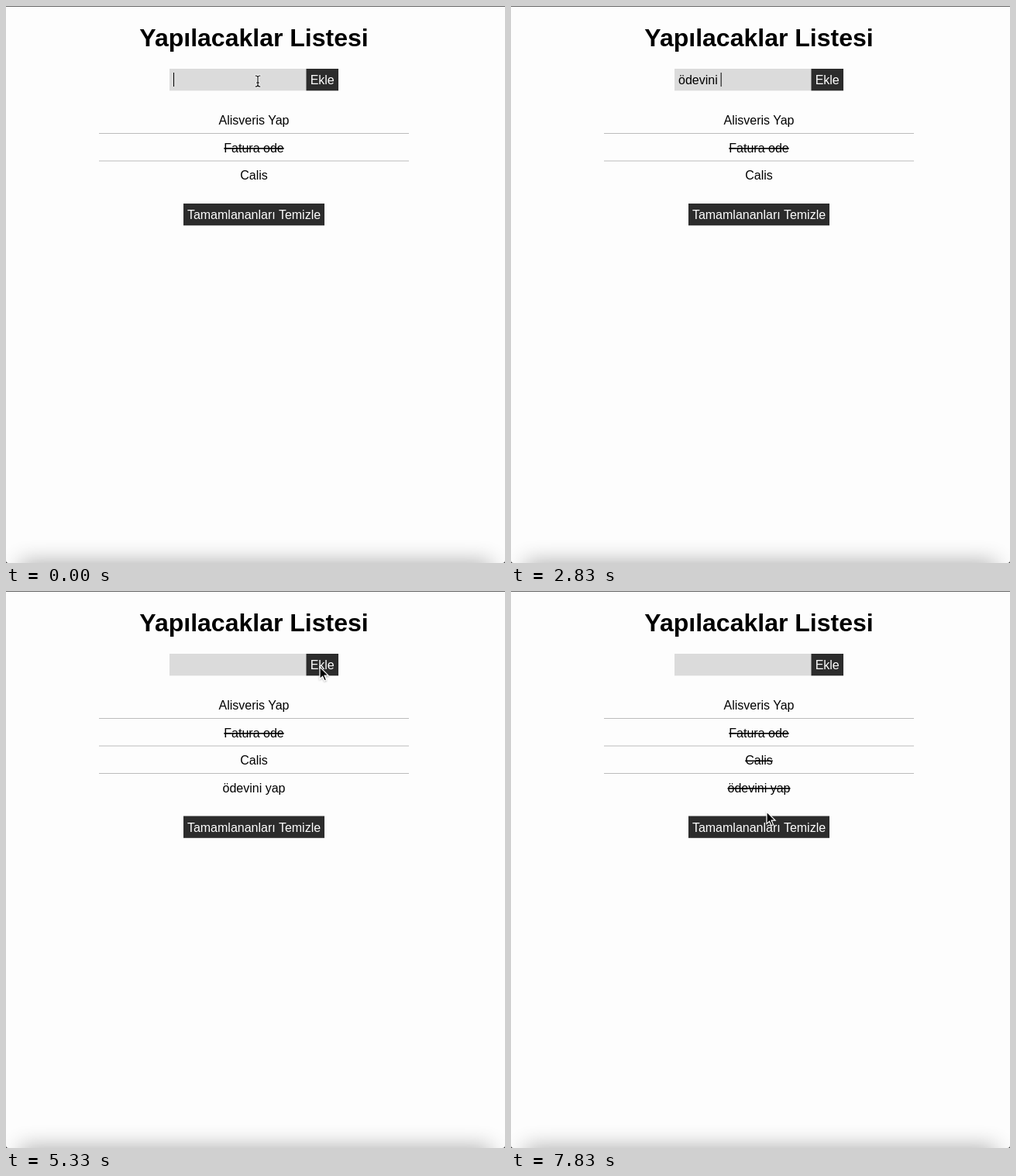
Recreate the animation shown at these times as an HTML page. Size 644 by 719 pixels, loop 8 s.

```html
<!DOCTYPE html>
<html lang="tr">
<head>
<meta charset="utf-8">
<title>Yapılacaklar Listesi</title>
<style>
  html, body { margin: 0; width: 100%; height: 100%; overflow: hidden; background: #fdfdfd; }
  svg { display: block; width: 644px; height: 719px; }
  text { font: 16px "Liberation Sans", Arial, sans-serif; white-space: pre; }
  .mid { text-anchor: middle; }
  .title { font-size: 32px; font-weight: bold; }
  .light { fill: #fff; }
  .dark { fill: #2c2c2c; }
  .done { text-decoration: line-through; }
  .rule { fill: #bcbcbc; }
</style>
</head>
<body>
<svg viewBox="0 0 644 719">
  <defs>
    <filter id="soft" x="-20%" y="-150%" width="140%" height="400%"><feGaussianBlur stdDeviation="14"/></filter>
    <filter id="drop" x="-50%" y="-50%" width="200%" height="200%">
      <feDropShadow dx="0" dy="1" stdDeviation="1" flood-opacity=".3"/>
    </filter>
  </defs>
  <rect width="644" height="719" fill="#fdfdfd"/>
  <rect x="18" y="717" width="608" height="60" opacity=".3" filter="url(#soft)"/>
  <rect width="644" height="1" fill="#666"/>
  <path d="M0 716Q0 719 3 719H0ZM644 716Q644 719 641 719H644Z" fill="#222"/>

  <text class="mid title" x="320" y="52">Yapılacaklar Listesi</text>
  <rect x="211" y="81" width="177" height="28.3" fill="#dbdbdb"/>
  <rect class="dark" x="387.5" y="81" width="41.5" height="28.3"/>
  <text class="mid light" x="408.2" y="101">Ekle</text>
  <text id="entry" x="216" y="101"></text>
  <rect id="caret" y="86" width="1" height="18"/>

  <g id="list"></g>
  <g id="clear">
    <rect class="dark" x="229" y="255" width="182" height="28.3"/>
    <text class="mid light" x="320" y="275">Tamamlananları Temizle</text>
  </g>

  <g id="cursor">
    <path id="arrow" d="M0 0V15.5L3.6 12.2 6 17.8 8.5 16.7 6.1 11.2H11Z" stroke="#fff" stroke-width="1.2" filter="url(#drop)"/>
    <g id="beam" fill="none" stroke-linecap="round">
      <path d="M-3-7Q0-7 0-5Q0-7 3-7M0-5V5M-3 7Q0 7 0 5Q0 7 3 7M-1.5 2H1.5" stroke="#fff" stroke-width="2.8"/>
      <path d="M-3-7Q0-7 0-5Q0-7 3-7M0-5V5M-3 7Q0 7 0 5Q0 7 3 7M-1.5 2H1.5" stroke="#000" stroke-width="1.1"/>
    </g>
  </g>
</svg>
<script>
const $ = id => document.getElementById(id);
const LOOP = 8000, TICKS_PER_MS = 0.006, ROW = 35.5;
const PHRASE = "ödevini yap";

// All schedules are in ticks, six per second.
const keyTicks = [6, 7, 8, 12, 14, 15, 16, 17, 18, 19, 20];
const caretSpans = [[0, 4], [6, 11], [12, 23], [26, 29]];
const ADD = 32;
const items = [
  { label: "Alisveris Yap", shown: 0, done: Infinity },
  { label: "Fatura ode", shown: 0, done: 0 },
  { label: "Calis", shown: 0, done: 44 },
  { label: PHRASE, shown: ADD, done: 41 }
];

// tick, x, y, shape
const cursorPath = [
  [0, 325, 97, "beam"], [1, 327, 98, "beam"], [2, 327, 97, "beam"], [5, 0, 0, ""],
  [27, 342, 96, "beam"], [28, 376, 88, "beam"], [29, 402, 105, "arrow"], [30, 405, 98, "arrow"],
  [34, 404, 110, "arrow"], [35, 398, 150, "arrow"], [36, 380, 212, "arrow"], [37, 358, 262, "arrow"],
  [38, 343, 274, "arrow"], [39, 335, 261, "beam"], [40, 332, 254, "beam"],
  [42, 331, 243, "arrow"], [43, 329, 220, "beam"], [45, 329, 237, "arrow"],
  [46, 330, 264, "arrow"], [47, 330, 285, "arrow"]
];

function make(tag, attributes, parent) {
  const node = document.createElementNS("http://www.w3.org/2000/svg", tag);
  for (const name in attributes) node.setAttribute(name, attributes[name]);
  return parent.appendChild(node);
}

items.forEach((item, i) => {
  item.row = make("g", {}, $("list"));
  if (i) make("rect", { class: "rule", x: 120, y: 164 + (i - 1) * ROW, width: 400, height: 1 }, item.row);
  item.text = make("text", { class: "mid", x: 320, y: 153 + i * ROW }, item.row);
  item.text.textContent = item.label;
});

function show(node, visible) {
  node.style.display = visible ? "" : "none";
}

function draw(tick) {
  const typed = keyTicks.filter(k => k <= tick).length;
  $("entry").textContent = tick < ADD ? PHRASE.slice(0, typed) : "";
  $("caret").setAttribute("x", 216 + (typed ? $("entry").getComputedTextLength() - 0.5 : 0));
  show($("caret"), caretSpans.some(([from, to]) => tick >= from && tick < to));

  for (const item of items) {
    show(item.row, tick >= item.shown);
    item.text.classList.toggle("done", tick >= item.done);
  }
  $("clear").setAttribute("transform", `translate(0 ${tick >= ADD ? ROW : 0})`);

  const [, x, y, shape] = cursorPath.findLast(step => step[0] <= tick);
  $("cursor").setAttribute("transform", `translate(${x} ${y})`);
  show($("arrow"), shape === "arrow");
  show($("beam"), shape === "beam");
}

function loop() {
  draw(Math.floor((performance.now() % LOOP) * TICKS_PER_MS + 0.05) % 48);
  requestAnimationFrame(loop);
}
loop();
</script>
</body>
</html>
```
